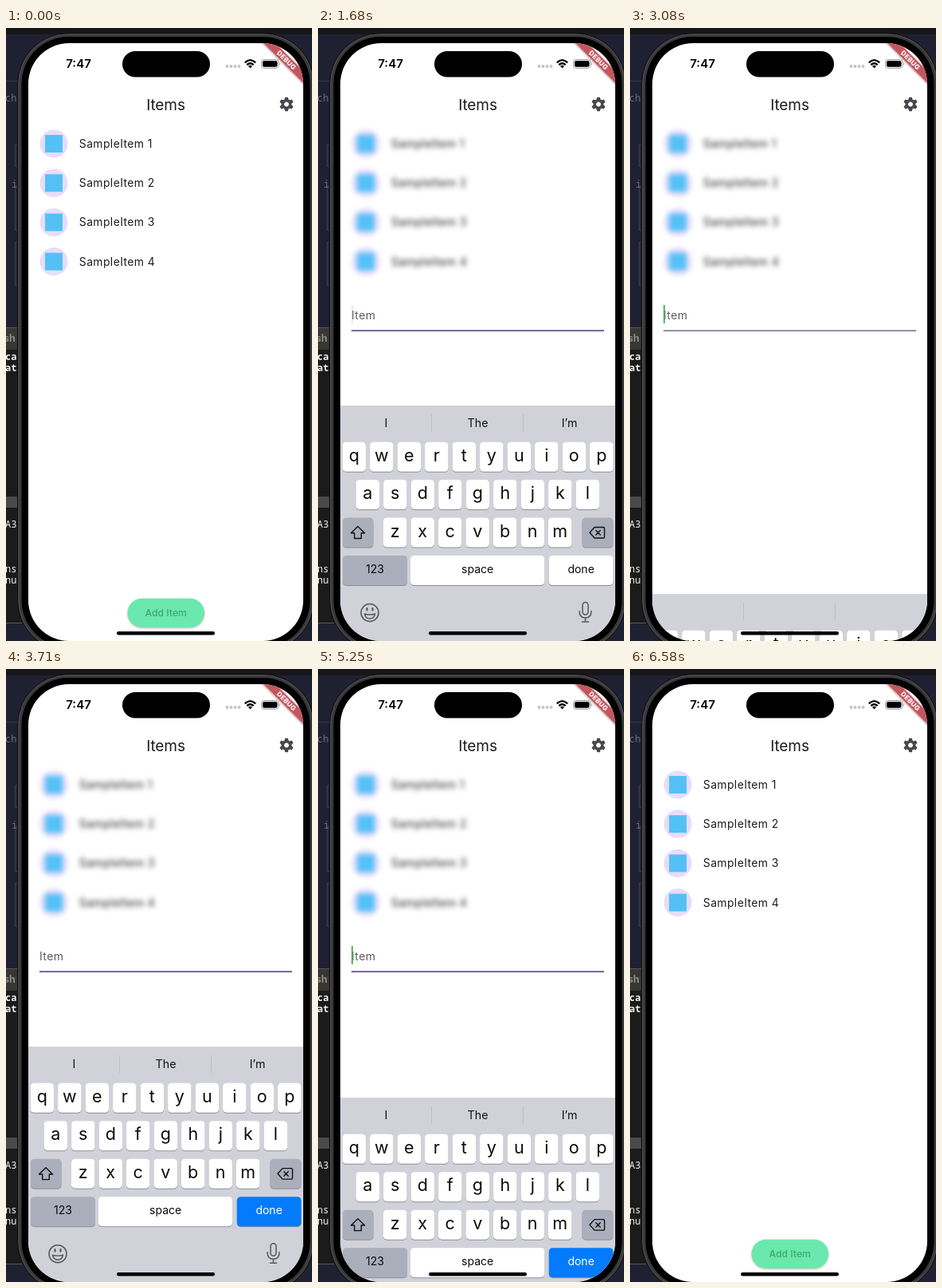
Recreate the animation shown at these times as an HTML page. Size 384x768 px, loop 6720 ms.

```html
<!DOCTYPE html>
<html lang="en">
<head>
<meta charset="utf-8">
<title>Items</title>
<style>
html, body { margin: 0; width: 100%; height: 100%; overflow: hidden; background: #1f2031; }
svg { display: block; width: 384px; height: 768px; font-family: Inter, "Open Sans", sans-serif; }
.mono { font: 700 12px "Noto Sans Mono", "DejaVu Sans Mono", monospace; }
.mid { text-anchor: middle; }
.body { font-size: 13.9px; letter-spacing: .42px; }
.line { fill: none; stroke: #55575e; stroke-width: 1.5; stroke-linecap: round; stroke-linejoin: round; }
.ink { fill: none; stroke: #111; stroke-width: 1.4; stroke-linecap: round; stroke-linejoin: round; }
</style>
</head>
<body>
<svg viewBox="0 0 384 768" xmlns="http://www.w3.org/2000/svg">
  <defs>
    <clipPath id="screen"><rect x="28" y="19" width="345" height="749" rx="51"/></clipPath>
    <filter id="soft" x="-20%" y="-40%" width="140%" height="180%">
      <feDropShadow dx="0" dy="0.8" stdDeviation="1.3" flood-color="#000" flood-opacity=".38"/>
    </filter>
  </defs>

  <!-- desktop behind the phone -->
  <rect width="384" height="768" fill="#1f2031"/>
  <rect width="384" height="8" fill="#17171a"/>
  <path d="M0 66.5H16" stroke="#3a3b48"/>
  <path d="M16 145.5H11.500V173.500H16M16 197.500H11.500V253.500H16M16 268.500H11.500V322.500H16" fill="#262737" stroke="#3f404c"/>
  <g class="mono" style="font-weight:400" fill="#6d6e7b"><text x="-1" y="92">ch</text><text x="7" y="200">i</text></g>
  <rect y="375" width="20" height="371" fill="#1b1b1c"/>
  <rect y="376" width="20" height="27" fill="#393734"/>
  <path d="M0 375.5H20M0 745.5H20" stroke="#57565a"/>
  <text x="-3" y="393" font-size="12.500" font-weight="700" fill="#8d8a87">sh</text>
  <rect y="587" width="15" height="14" fill="#4a4a4b"/>
  <g class="mono" fill="#f0f0f0">
    <text x="-1" y="416">ca</text><text x="-1" y="430">at</text>
    <g font-weight="400" style="font-weight:400"><text x="-1" y="626">A3</text><text x="-1" y="682">ns</text><text x="-1" y="696">nu</text></g>
  </g>

  <!-- phone -->
  <rect x="14.500" y="6.500" width="372" height="774" rx="64" fill="#39393b" stroke="#0c0c0d"/>
  <rect x="16" y="8" width="369" height="771" rx="62" fill="none" stroke="#55555a" stroke-width=".8"/>
  <rect x="19.500" y="11" width="362" height="765" rx="59"/>

  <g clip-path="url(#screen)">
    <rect x="28" y="19" width="345" height="749" fill="#fff"/>
    <g id="list" class="body" fill="#1d1b20"></g>

    <g id="button">
      <rect x="152.500" y="714.800" width="96.500" height="36" rx="18" fill="#6ae8ad" filter="url(#soft)"/>
      <text class="mid" x="200.700" y="737.200" font-size="12.200" font-weight="500" fill="#41a869">Add Item</text>
    </g>

    <g id="field">
      <rect id="base" y="379" height="1" fill="#96939a"/>
      <rect id="focus" y="378.300" height="1.800" fill="#65558f"/>
      <text id="hint" class="body" y="364.500" fill="#5d5a62">Item</text>
      <rect id="caret" x="42" y="347" width="1.800" height="23" fill="#4caf50"/>
    </g>

    <g id="keyboard">
      <rect x="28" y="473" width="345" height="300" fill="#d1d2d9"/>
      <path d="M142.500 484V506M257.500 484V506" stroke="#bdbfc7"/>
      <g id="words" class="mid" font-size="14.200" fill="#111">
        <text x="85.500" y="500">I</text><text x="200.500" y="500">The</text><text x="315.500" y="500">I’m</text>
      </g>
      <g id="keys" class="mid"></g>
      <path class="ink" d="M50 624.500L58.500 632.800H54.300V639.500H45.700V632.800H41.500Z"/>
      <path class="ink" d="M347 625.500H358Q359.500 625.500 359.500 627V637.500Q359.500 639 358 639H347L341 632.200ZM348.800 629.500L354.200 635M354.200 629.500L348.800 635"/>
      <g class="line">
        <circle cx="65" cy="732.500" r="11"/>
        <path d="M58.500 734Q65 736 71.500 734Q70.500 740 65 740T58.500 734Z"/>
        <path d="M61.500 727V729.500M68.500 727V729.500" stroke-width="2.200"/>
        <rect x="332" y="719.500" width="7" height="15.500" rx="3.500"/>
        <path d="M328 730.500Q328 739 335.500 739T343 730.500M335.500 739V744M331.500 744H339.500"/>
      </g>
    </g>

    <!-- app bar -->
    <text class="mid" x="200.500" y="102.800" font-size="19" letter-spacing="-.1" fill="#1d1b20">Items</text>
    <g id="gear" transform="translate(352 95.500)" fill="#49474d">
      <circle r="4.700" fill="none" stroke="#49474d" stroke-width="3.400"/>
    </g>

    <!-- status bar -->
    <text class="mid" x="91" y="50" font-size="15" font-weight="600">7:47</text>
    <rect x="146" y="29" width="110" height="32.500" rx="16.200"/>
    <path d="M277.500 48H293" stroke="#c4c4c6" stroke-width="4" stroke-linecap="round" stroke-dasharray="0 5"/>
    <g fill="none" stroke="#000" stroke-width="2.300">
      <path d="M299.800 43.300Q306.500 37 313.200 43.300M302.300 46.200Q306.500 42.300 310.700 46.200"/>
    </g>
    <path d="M304 47.800Q306.500 45.700 309 47.800L306.500 50.400Z"/>
    <rect x="320.500" y="39.500" width="21.500" height="10.800" rx="3.400" fill="none" stroke="#9a9a9a"/>
    <rect x="322" y="41" width="18.500" height="7.800" rx="2.200"/>
    <path d="M343.300 43.200Q345.200 45 343.300 46.800Z" fill="#9a9a9a"/>

    <g transform="translate(373 19) rotate(45)">
      <rect x="-50" y="24.600" width="100" height="10.700" fill="#c4575b" filter="url(#soft)"/>
      <text class="mid" x=".3" y="32.900" font-size="8.300" font-weight="800" letter-spacing=".3" fill="#fff">DEBUG</text>
    </g>
  </g>
  <rect x="139" y="756" width="123" height="4.400" rx="2.200"/>
</svg>

<script>
const LOOP = 6720, STEP = 70, CLOSE = 630;
const CYCLES = [[350, 1610], [2660, 3850], [4690, 5950]];   // start of opening, start of closing
const el = id => document.getElementById(id);
const NS = "http://www.w3.org/2000/svg";

function add(parent, tag, attrs, text) {
  const node = document.createElementNS(NS, tag);
  for (const name in attrs) node.setAttribute(name, attrs[name]);
  if (text) node.textContent = text;
  return parent.appendChild(node);
}

for (let i = 0; i < 4; i++) {
  const y = 145 + i * 49.2, list = el("list");
  add(list, "circle", { cx: 60, cy: y, r: 17.6, fill: "#e8dcfb" });
  add(list, "rect", { x: 49, y: y - 11, width: 22, height: 22, fill: "#54c1f6" });
  add(list, "text", { x: 91.8, y: y + 5 }, "SampleItem " + (i + 1));
}

for (let a = 0; a < 360; a += 60)
  add(el("gear"), "path", { d: "M-2.700 -5L-1.800 -8.800H1.800L2.700 -5Z", transform: `rotate(${a})` });

function key(x, y, w, label, size, fill = "#fff") {
  const keys = el("keys");
  add(keys, "rect", { x, y: y + 1, width: w, height: 37, rx: 4.5, fill: "#8d8f96" });
  const cap = add(keys, "rect", { x, y, width: w, height: 37, rx: 4.5, fill });
  const name = add(keys, "text", { x: x + w / 2, y: y + (size > 16 ? 24.2 : 22.3), "font-size": size, fill: "#0b0b0c" }, label);
  return { cap, name };
}

[["qwertyuiop", 30.6], ["asdfghjkl", 47.6], ["zxcvbnm", 82]].forEach(([row, x], r) =>
  [...row].forEach((c, i) => key(x + i * 34.5, 518.7 + r * 47.4, 29.4, c, 21.5)));
key(31, 613.5, 38.5, "", 14, "#abaebb");
key(331.5, 613.5, 38.8, "", 14, "#abaebb");
key(31, 661, 81, "123", 14, "#abaebb");
key(116, 661, 168.3, "space", 14);
const done = key(289.8, 661, 80.6, "done", 14);

const ramp = (t, a, b) => Math.min(1, Math.max(0, (t - a) / (b - a)));
const smooth = p => p * p * (3 - 2 * p);
function spring(t, start, tau) {
  const s = Math.max(0, t - start) / tau;
  return 1 - (1 + s) * Math.exp(-s);
}

function pose(t) {
  for (const [start, close] of CYCLES) {
    if (t < start || t >= close + CLOSE) continue;
    const o = t - start, c = t - close;
    if (c < 0) return {
      open: true,
      width: 0.355 + 0.645 * smooth(ramp(o, -50, 200)) * ramp(o, 0, 60),
      rise: smooth(ramp(o, 20, 340)),
      focus: ramp(o, 300, 500),
      keys: spring(o, 364, 68),
      caret: ramp(o, 340, 410) * (1 - ramp(o, 840, 1050)),
      words: o > 520
    };
    return {
      open: true,
      width: 1 - 0.75 * smooth(ramp(c, 330, 580)),
      rise: 1 - smooth(ramp(c, 120, 500)),
      focus: 1 - ramp(c, 100, 300),
      keys: 1 - spring(c, 85, 60),
      caret: c > 0 && c < 100 ? 0.2 : 0,
      words: true,
      pressed: c < 140
    };
  }
  return { open: false, width: 0, rise: 0, focus: 0, keys: 0, caret: 0 };
}

function set(id, attrs) {
  for (const name in attrs) el(id).setAttribute(name, attrs[name]);
}

function draw(t) {
  const p = pose(t);
  const w = 97 + 220 * p.width, x = 200.5 - w / 2;
  set("button", { visibility: p.open ? "hidden" : "visible" });
  set("field", { visibility: p.open ? "visible" : "hidden", transform: `translate(0 ${374.5 * (1 - p.rise)})` });
  set("base", { x, width: w });
  set("focus", { x, width: w, opacity: p.focus });
  set("hint", { x });
  set("caret", { x, opacity: p.caret });
  set("keyboard", { transform: `translate(0 ${295 * (1 - p.keys)})`, visibility: p.keys > 0.01 ? "visible" : "hidden" });
  set("words", { opacity: p.words ? 1 : 0 });
  el("list").style.filter = p.rise > 0.01 ? `blur(${3 * p.rise}px)` : "none";
  done.cap.setAttribute("fill", p.pressed ? "#fff" : "#047bfd");
  done.name.setAttribute("fill", p.pressed ? "#0b0b0c" : "#fff");
}

const begin = performance.now();
function tick() {
  const t = (performance.now() - begin) % LOOP;
  draw(Math.floor(t / STEP) * STEP);
  requestAnimationFrame(tick);
}
tick();
</script>
</body>
</html>
```
